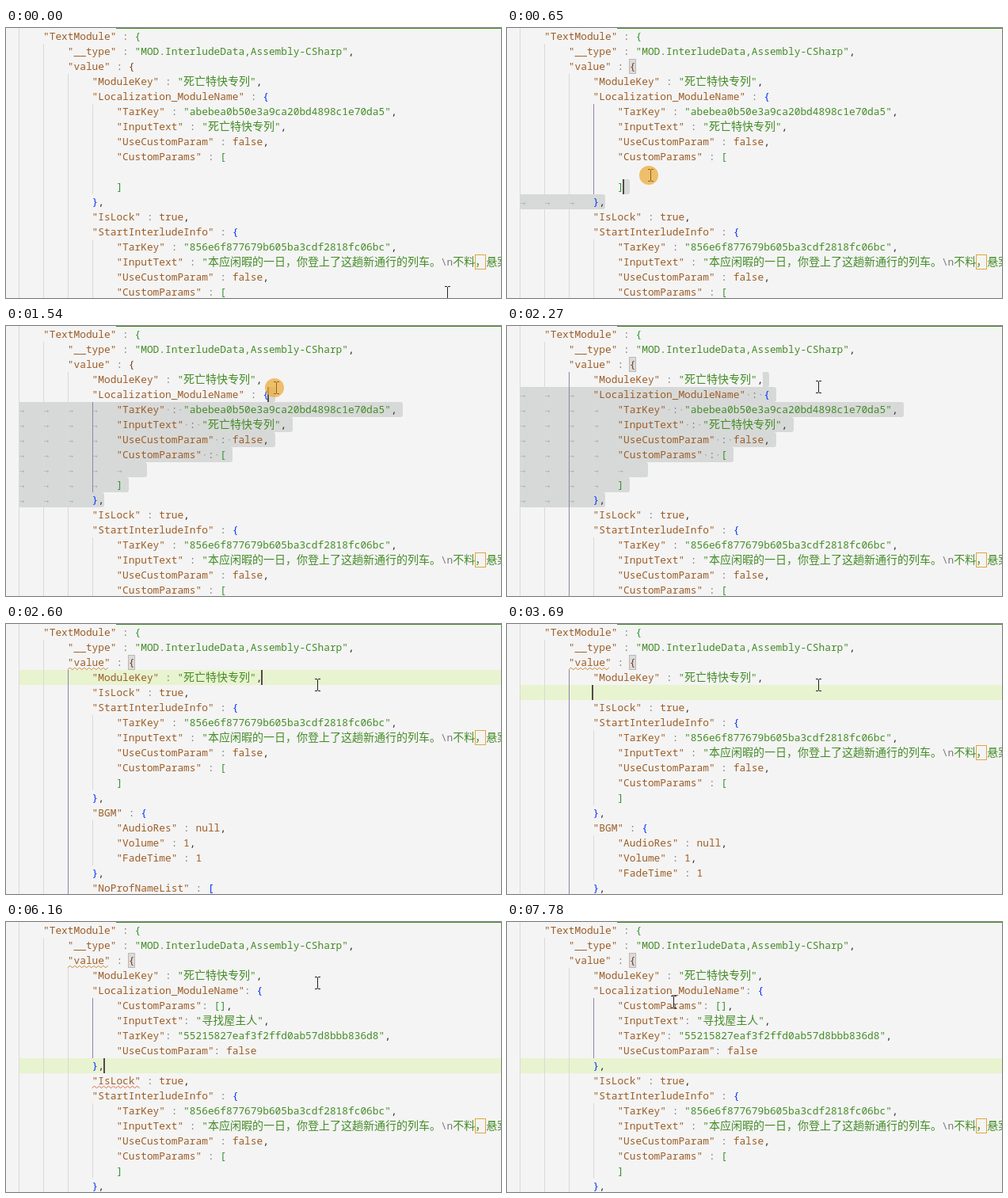
Animation of 625 by 341 pixels, one loop 8000 ms. Source, as an HTML page with a canvas:

```html
<!DOCTYPE html>
<html lang="zh-CN">
<head>
<meta charset="utf-8">
<title>JSON editor</title>
<style>
html, body { margin: 0; width: 100%; height: 100%; overflow: hidden; background: #f4f4f4; }
canvas { display: block; width: 100vw; height: 100vh; }
</style>
</head>
<body>
<canvas id="stage" width="625" height="341"></canvas>
<script>
(() => {
const ctx = document.getElementById('stage').getContext('2d');
const W = 625, H = 341, LOOP = 8000;
const LEFT = 16.2, CELL = 7.7, WIDE = 14, TAB = CELL * 4, ROW = 19;
const MONO = '12.83px "Noto Sans Mono", "DejaVu Sans Mono", monospace';
const CJK = '14px "Noto Sans CJK SC", "Noto Sans CJK", sans-serif';
const BRACKETS = ['#0431fa', '#319331', '#7b3814'];
const KEY = '#9c5d27', STRING = '#448c27', PUNCT = '#777777', PLAIN = '#333333';

const tabs = (n, ...lines) => lines.map(s => '\t'.repeat(n) + s);
const head = [
  ...tabs(1, '"TextModule" : {'),
  ...tabs(2, '"__type" : "MOD.InterludeData,Assembly-CSharp",', '"value" : {'),
  ...tabs(3, '"ModuleKey" : "死亡特快专列",')
];
const oldBlock = [
  ...tabs(3, '"Localization_ModuleName" : {'),
  ...tabs(4, '"TarKey" : "abebea0b50e3a9ca20bd4898c1e70da5",', '"InputText" : "死亡特快专列",',
    '"UseCustomParam" : false,', '"CustomParams" : [', '\t', ']'),
  ...tabs(3, '},')
];
const newBlock = [
  ...tabs(3, '"Localization_ModuleName": {'),
  ...tabs(4, '"CustomParams": [],', '"InputText": "寻找屋主人",',
    '"TarKey": "55215827eaf3f2ffd0ab57d8bbb836d8",', '"UseCustomParam": false'),
  ...tabs(3, '},')
];
const tail = [
  ...tabs(3, '"IsLock" : true,', '"StartInterludeInfo" : {'),
  ...tabs(4, '"TarKey" : "856e6f877679b605ba3cdf2818fc06bc",',
    '"InputText" : "本应闲暇的一日，你登上了这趟新通行的列车。\\n不料，悬案',
    '"UseCustomParam" : false,', '"CustomParams" : [', ']'),
  ...tabs(3, '},', '"BGM" : {'),
  ...tabs(4, '"AudioRes" : null,', '"Volume" : 1,', '"FadeTime" : 1'),
  ...tabs(3, '},', '"NoProfNameList" : [')
];

// Glyph positions and colours of one line
function layout(text) {
  const xs = [LEFT], colors = [], indent = text.match(/^\t*/)[0].length;
  for (const c of text) {
    const w = c === '\t' ? TAB : c > '\u2fff' ? WIDE : CELL;
    xs.push(xs[xs.length - 1] + w);
  }
  for (const m of text.matchAll(/"[^"]*"(?=\s*:)|"[^"]*"?|[\[\]{}]|\w+|[^\s"]/g)) {
    const s = m[0], isKey = /^\s*:/.test(text.slice(m.index + s.length));
    const color = s[0] === '"' ? (isKey ? KEY : STRING)
      : /[\[\]{}]/.test(s) ? BRACKETS[indent % 3]
      : /\w/.test(s) ? KEY : s === ':' ? PUNCT : PLAIN;
    for (let i = 0; i < s.length; i++) {
      colors[m.index + i] = s[i] === '\\' || s[i - 1] === '\\' ? PUNCT : color;
    }
  }
  return { text, xs, colors, indent, end: xs[xs.length - 1] };
}
const build = block => [...head, ...block, ...tail].slice(0, 18).map(layout);
const docs = {
  before: build(oldBlock),
  cut: build([]),
  blank: build(tabs(3, '')),
  quote: build(tabs(3, '""')),
  after: build(newBlock)
};

const rowTop = row => 1 + row * ROW;
const box = (x, y, w, h, color) => { ctx.fillStyle = color; ctx.fillRect(x, y, w, h); };

// time, x, y of the mouse
const path = [
  [0, 557, 334], [70, 557, 334], [250, 380, 285], [450, 132, 221], [540, 125, 219],
  [700, 205, 172], [860, 298, 121], [920, 304, 114], [1250, 325, 92], [1540, 341, 78],
  [1610, 343, 72], [1730, 343, 71], [2070, 343, 71], [2270, 393, 77],
  [7160, 393, 77], [7300, 350, 80], [7560, 240, 96], [7780, 210, 101], [LOOP, 210, 101]
];
function mouseAt(t) {
  const i = Math.max(1, path.findIndex(p => p[0] >= t));
  const [t0, x0, y0] = path[i - 1], [t1, x1, y1] = path[i];
  const k = (t - t0) / (t1 - t0);
  return { x: x0 + (x1 - x0) * k, y: y0 + (y1 - y0) * k };
}

const PRESS = 520, CUT = 2600, ENTER = 3690, TYPE = 5370, ACCEPT = 6160, VALID = 6230;
const LAST = 11;
const hidden = [[2130, CUT], [3080, 3550], [4160, 4620], [5160, TYPE], [5830, ACCEPT], [6640, 7160], [7640, LOOP]];

// Caret position under the dragged mouse
function dragCaret(t) {
  if (t >= 1590) return { row: 3, x: docs.before[3].end };
  const m = mouseAt(Math.max(t - 40, 540));
  const row = Math.max(3, Math.min(LAST, Math.floor((m.y - 1) / ROW)));
  const near = (a, b) => Math.abs(b - m.x) < Math.abs(a - m.x) ? b : a;
  return { row, x: docs.before[row].xs.reduce(near) };
}

function stateAt(t) {
  if (t < PRESS) return { doc: docs.before };
  const value = { g: 2, from: 3, to: 17 };
  if (t < CUT) {
    const caret = dragCaret(t);
    return {
      doc: docs.before, caret, selected: true,
      guide: caret.row === 3 ? value : { g: 3, from: 5, to: 10 },
      bracket: t < 1000 || caret.row === 3 ? 2 : null
    };
  }
  const [name, row, x] = t < ENTER ? ['cut', 3, docs.cut[3].end]
    : t < TYPE ? ['blank', 4, LEFT + 3 * TAB]
    : t < ACCEPT ? ['quote', 4, LEFT + 3 * TAB + CELL]
    : ['after', 9, docs.after[9].end];
  return {
    doc: docs[name], caret: { row, x }, bracket: 2,
    guide: name === 'after' ? { g: 3, from: 5, to: 8 } : value
  };
}

function drawSelection(doc, caret) {
  for (let r = caret.row; r <= LAST; r++) {
    const { text, xs, end } = doc[r];
    const x0 = r === caret.row ? caret.x : LEFT;
    const x1 = r === LAST ? end : end + CELL;
    if (x1 - x0 < 1) continue;
    ctx.fillStyle = '#d7d9d8';
    ctx.beginPath();
    const right = r === LAST ? [0, 3, 3, 3] : [0, 3, 3, 0];
    ctx.roundRect(Math.floor(x0), rowTop(r), Math.round(x1) - Math.floor(x0), ROW, right);
    ctx.fill();
    ctx.fillStyle = '#98b0a4';
    ctx.font = MONO;
    [...text].forEach((c, i) => {
      if (xs[i] < x0 - 0.1) return;
      if (c === '\t') ctx.fillText('→', xs[i], rowTop(r) + 14);
      if (c === ' ') ctx.fillRect(xs[i] + 3, rowTop(r) + 9, 1.5, 1.5);
    });
  }
}

function drawGuides(doc, active) {
  doc.forEach((line, r) => {
    for (let g = 0; g < Math.min(4, line.indent); g++) {
      const on = active && g === active.g && r >= active.from && r <= active.to;
      box(Math.round(LEFT + g * TAB), rowTop(r), 1, ROW, on ? '#9180ad' : '#d9d9d9');
    }
  });
  box(16, 0, 1, 1, '#d9d9d9');
}

function drawLine({ text, xs, colors }, r) {
  for (let i = 0; i < text.length; i++) {
    if (!colors[i] || text[i] === ' ') continue;
    ctx.font = text[i] > '\u2fff' ? CJK : MONO;
    ctx.fillStyle = colors[i];
    ctx.fillText(text[i], xs[i], rowTop(r) + 14);
  }
  const mark = text.indexOf('料，');
  if (mark > 0) {
    const x = Math.round(xs[mark + 1]);
    ctx.strokeStyle = '#dfa640';
    ctx.lineWidth = 1;
    ctx.strokeRect(x + 0.5, rowTop(r) + 0.5, 13, ROW - 1);
  }
}

function drawBracket(line, r) {
  const x = Math.floor(line.end - CELL);
  box(x, rowTop(r), 9, ROW, '#b8b8b8');
  box(x + 1, rowTop(r) + 1, 7, ROW - 2, '#dcdcdc');
}

function squiggle(row, indent, chars, color) {
  const x0 = LEFT + indent * TAB, y = rowTop(row) + ROW - 1.5;
  ctx.strokeStyle = color;
  ctx.lineWidth = 1;
  ctx.beginPath();
  for (let i = 0; i * 3 <= chars * CELL; i++) ctx.lineTo(x0 + i * 3, y + (i % 2 ? -1.2 : 1.2));
  ctx.stroke();
}

function drawPopup() {
  box(117, 96, 431, 23, '#c8c8c8');
  box(118, 97, 429, 21, '#f3f3f3');
  box(118, 97, 429, 20, '#cadeb9');
  ctx.strokeStyle = '#666666';
  ctx.lineWidth = 1;
  ctx.strokeRect(123.5, 102.5, 9, 9);
  ctx.font = MONO;
  ctx.fillStyle = PLAIN;
  ctx.fillText('Localization_ModuleName', 139, 111);
}

function drawMouse(t) {
  const m = mouseAt(t), x = Math.round(m.x), y = Math.round(m.y);
  const pressed = t >= PRESS && t < 1930;
  if (pressed) {
    ctx.fillStyle = t < 1730 ? 'rgba(236,172,60,.75)' : 'rgba(236,172,60,.4)';
    ctx.beginPath();
    ctx.arc(x - 2, y, 12, 0, 7);
    ctx.fill();
  }
  const ink = pressed ? '#8a6426' : '#222222';
  box(x, y - 7, 1, 14, ink);
  for (const dy of [-8, 7]) {
    box(x - 3, y + dy, 3, 1, ink);
    box(x + 1, y + dy, 3, 1, ink);
  }
}

function draw(t) {
  const { doc, caret, selected, guide, bracket } = stateAt(t);
  box(0, 0, W, H, '#f4f4f4');
  box(139, 0, W - 139, 1, STRING);
  const empty = caret && (!selected || (caret.row === LAST && caret.x === doc[LAST].end));
  if (empty) box(17, rowTop(caret.row), W, ROW, '#e8f3cf');
  if (selected) drawSelection(doc, caret);
  drawGuides(doc, guide);
  if (bracket) drawBracket(doc[bracket], bracket);
  doc.forEach(drawLine);
  if (t >= CUT && t < VALID) squiggle(2, 2, 7, '#d08a35');
  if (t >= TYPE && t < VALID) squiggle(t < ACCEPT ? 5 : 10, 3, 8, '#e06a40');
  if (t >= TYPE && t < ACCEPT) drawPopup();
  if (caret && !hidden.some(([a, b]) => t >= a && t < b)) {
    box(Math.floor(caret.x) - 1, rowTop(caret.row), 2, ROW, '#54494b');
  }
  drawMouse(t);
}

const start = performance.now();
function tick() {
  draw((performance.now() - start) % LOOP);
  requestAnimationFrame(tick);
}
tick();
})();
</script>
</body>
</html>
```
